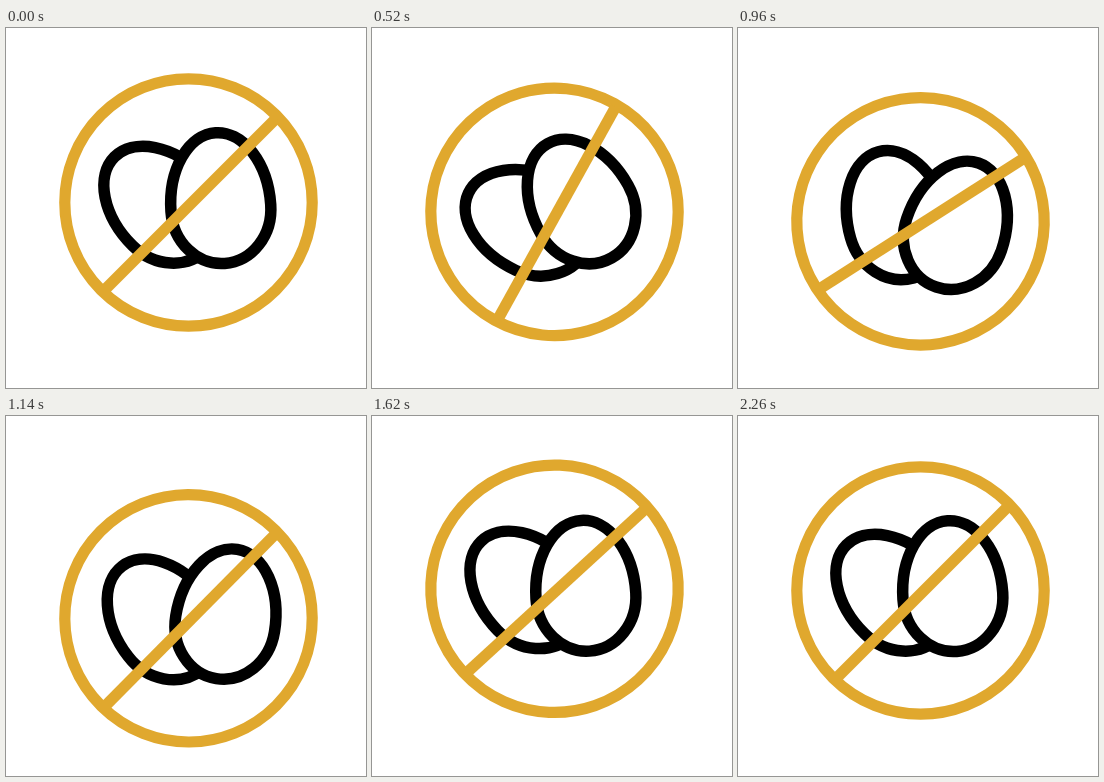
An HTML page that plays this animation: 360x360 px, repeating every 2400 ms.

```html
<!DOCTYPE html>
<html lang="en">
<head>
<meta charset="utf-8">
<title>No eggs</title>
<style>
  html, body { margin: 0; width: 100%; height: 100%; overflow: hidden; background: #fff; }
  svg { display: block; width: 100vw; height: 100vh; }
  .egg { fill: #fff; stroke: #000; stroke-width: 11.5; }
  .sign { fill: none; stroke: #e0a82e; stroke-width: 11.2; }
</style>
</head>
<body>
<svg viewBox="0 0 360 360">
  <defs>
    <path id="egg" d="M-50 0A50 75.5 0 0 1 50 0A50 55.5 0 0 1 -50 0Z"/>
  </defs>
  <g id="badge">
    <use id="left" href="#egg" class="egg"/>
    <use id="right" href="#egg" class="egg"/>
    <circle class="sign" r="123.7"/>
    <path class="sign" d="M-84.2 87.8L87.8 -84.2"/>
  </g>
</svg>
<script>
const LOOP = 2400;

// cubic-bezier(.42, 0, .58, 1), solved with Newton steps
function easeInOut(x) {
  let s = x;
  for (let i = 0; i < 5; i++) {
    s -= (1.26 * s - 0.78 * s * s + 0.52 * s ** 3 - x) / (1.26 - 1.56 * s + 1.56 * s * s);
  }
  return s * s * (3 - 2 * s);
}

// Eases from rest through evenly spaced peaks and back to rest
function wobble(t, step, ...peaks) {
  const pos = Math.max(0, t / step), i = Math.floor(pos);
  const from = peaks[i - 1] ?? 0, to = peaks[i] ?? 0;
  return from + (to - from) * easeInOut(pos - i);
}

function place(id, transform) {
  document.getElementById(id).setAttribute('transform', transform);
}

function draw(t) {
  const drop = wobble(t, 360, 29.7, -20, 30.3, -12.7, 9);
  const swing = wobble(t, 440, -18.2, 13.9, -7.7, 5.2);
  const leftTilt = wobble(t, 330, -9.5, -1, 17.2, -4.7, -1.5);
  const rightTilt = wobble(t - 200, 440, -11, 14.2, -2.4);

  place('badge', `translate(182.5 ${174.5 + drop}) rotate(${swing})`);
  place('left', `translate(-20.6 7.8) rotate(${leftTilt - 45})`);
  place('right', `translate(33.6 23.5) rotate(${rightTilt - 4}) translate(0 -18)`);
}

const start = performance.now();
function tick() {
  draw((performance.now() - start) % LOOP);
  requestAnimationFrame(tick);
}
tick();
</script>
</body>
</html>
```
